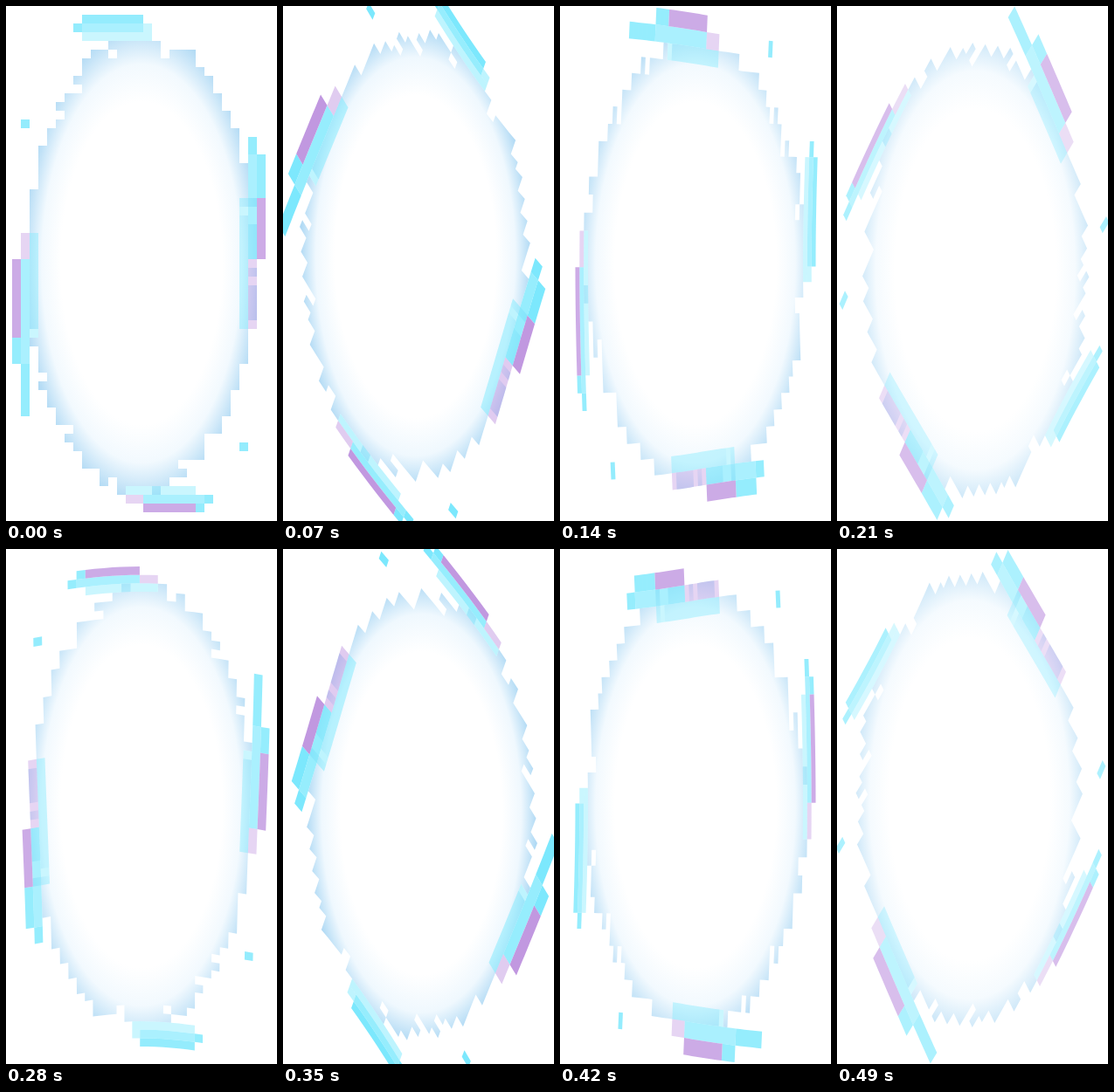
Animation of 310x590 px, one loop 560 ms. Source, as an HTML page with a canvas:

```html
<!DOCTYPE html>
<html lang="en">
<head>
<meta charset="utf-8">
<title>Portal</title>
<style>
  html, body { margin: 0; width: 100%; height: 100%; overflow: hidden; background: #fff; }
  canvas { display: block; }
</style>
</head>
<body>
<canvas id="stage" width="310" height="590"></canvas>
<script>
const ctx = document.getElementById('stage').getContext('2d');
const STEP = 70, STEPS = 8;
const CELL = 10, LEFT = 7, COLS = 31, ROWS = 59;
const CX = 155, CY = 295, ASPECT = 2, RADIUS = 132;
const CYAN = '#7ae8fd', PURPLE = '#c096e0', PALE = 0.5;

const radians = degrees => degrees * Math.PI / 180;

const noise = (c, r) => {
  const n = Math.sin(c * 12.9898 + r * 78.233) * 43758.5453;
  return n - Math.floor(n);
};

// Body: grid cells inside a ragged ellipse, with a few notches in its rim.
function makeBody() {
  const cells = [];
  for (let r = 0; r < ROWS; r++) {
    for (let c = 0; c < COLS; c++) {
      const x = LEFT + (c + 0.5) * CELL - CX;
      const y = ((r + 0.5) * CELL - CY) / ASPECT;
      const reach = Math.hypot(x, y) / RADIUS;
      const notch = reach > 0.9 && noise(r, c) > 0.92;
      if (reach < 0.97 + 0.04 * noise(c, r) && !notch) cells.push([c, r]);
    }
  }
  return cells;
}

// Each side turns (steps clockwise, depth inwards) into a grid cell.
const sides = {
  top: (s, d) => [s, 1 + d],
  right: (s, d) => [28 - d, s],
  bottom: (s, d) => [30 - s, 57 - d],
  left: (s, d) => [d, 58 - s]
};

// A wisp runs clockwise: thin tip, tail, bright core, fading root.
function wisp(side, start, [tip, tail, core, root], color) {
  const layers = [];
  const at = sides[side];
  const run = (from, length, depth, fill, alpha) => {
    const cells = Array.from({ length }, (_, i) => at(from + i, depth));
    layers.push({ cells, fill, alpha });
  };
  const tailAt = start + tip, coreAt = tailAt + tail, rootAt = coreAt + core;
  run(start, tip, 1, CYAN, 1);
  run(tailAt, tail, 0, CYAN, 1);
  run(tailAt, tail + core, 1, CYAN, 0.8);
  run(coreAt, core + root, 2, CYAN, PALE);
  run(coreAt, core, 0, color, 1);
  run(rootAt, root, 1, color, PALE);
  return layers;
}

function spark(degrees) {
  const x = CX + 160 * Math.cos(radians(degrees));
  const y = CY + 160 * ASPECT * Math.sin(radians(degrees));
  return [Math.floor((x - LEFT) / CELL), Math.floor(y / CELL)];
}

const body = makeBody();
const layers = [
  ...wisp('top', 7, [1, 0, 7, 1], CYAN),
  ...wisp('right', 15, [2, 5, 7, 8], PURPLE),
  ...wisp('bottom', 8, [1, 1, 6, 2], PURPLE),
  ...wisp('left', 12, [6, 3, 9, 3], PURPLE),
  { cells: [spark(42), spark(211)], fill: CYAN, alpha: 1 }
];

// An eighth of a turn per step, lagging and swaying slightly on the diagonals.
function poseAt(step) {
  const angle = radians(360 / STEPS * step);
  const beat = Math.sin(2 * angle);
  const sway = 2 * Math.sin(angle) * beat;
  return {
    atRest: step === 0,
    turn: angle - radians(10) * Math.max(0, beat),
    x: CX - 2.4 * sway,
    y: CY - 5.5 * sway,
    strength: 0.8 + 0.18 * beat
  };
}

// Turns a grid corner on a circle, then stretches it to the ellipse.
function place(c, r, pose) {
  const x = LEFT + c * CELL, y = r * CELL;
  if (pose.atRest) return [x, y];
  const dx = x - CX, dy = (y - CY) / ASPECT;
  const radius = 0.965 * Math.hypot(dx, dy);
  const angle = Math.atan2(dy, dx);
  const turned = angle - 0.08 * Math.cos(angle) + pose.turn;
  return [pose.x + radius * Math.cos(turned), pose.y + ASPECT * radius * Math.sin(turned)];
}

function cellPath(cells, pose) {
  const path = new Path2D();
  for (const [c, r] of cells) {
    path.moveTo(...place(c, r, pose));
    path.lineTo(...place(c + 1, r, pose));
    path.lineTo(...place(c + 1, r + 1, pose));
    path.lineTo(...place(c, r + 1, pose));
    path.closePath();
  }
  return path;
}

function drawBody(pose) {
  const glow = ctx.createRadialGradient(0, 0, RADIUS * 0.7, 0, 0, RADIUS * 1.03);
  glow.addColorStop(0, '#fff');
  glow.addColorStop(0.5, '#eff8fe');
  glow.addColorStop(1, '#a0d2f2');
  ctx.save();
  ctx.globalAlpha = pose.strength;
  ctx.clip(cellPath(body, pose));
  ctx.translate(pose.x, pose.y);
  ctx.scale(1, ASPECT);
  ctx.fillStyle = glow;
  ctx.fillRect(-200, -200, 400, 400);
  ctx.restore();
}

function draw(pose) {
  ctx.globalAlpha = 1;
  ctx.fillStyle = '#fff';
  ctx.fillRect(0, 0, 310, 590);
  drawBody(pose);
  for (const { cells, fill, alpha } of layers) {
    ctx.globalAlpha = alpha * pose.strength;
    ctx.fillStyle = fill;
    ctx.fill(cellPath(cells, pose));
  }
}

const start = performance.now();
let shown = -1;
function tick() {
  const step = Math.floor((performance.now() - start) / STEP) % STEPS;
  if (step !== shown) draw(poseAt(shown = step));
  requestAnimationFrame(tick);
}
tick();
</script>
</body>
</html>
```
